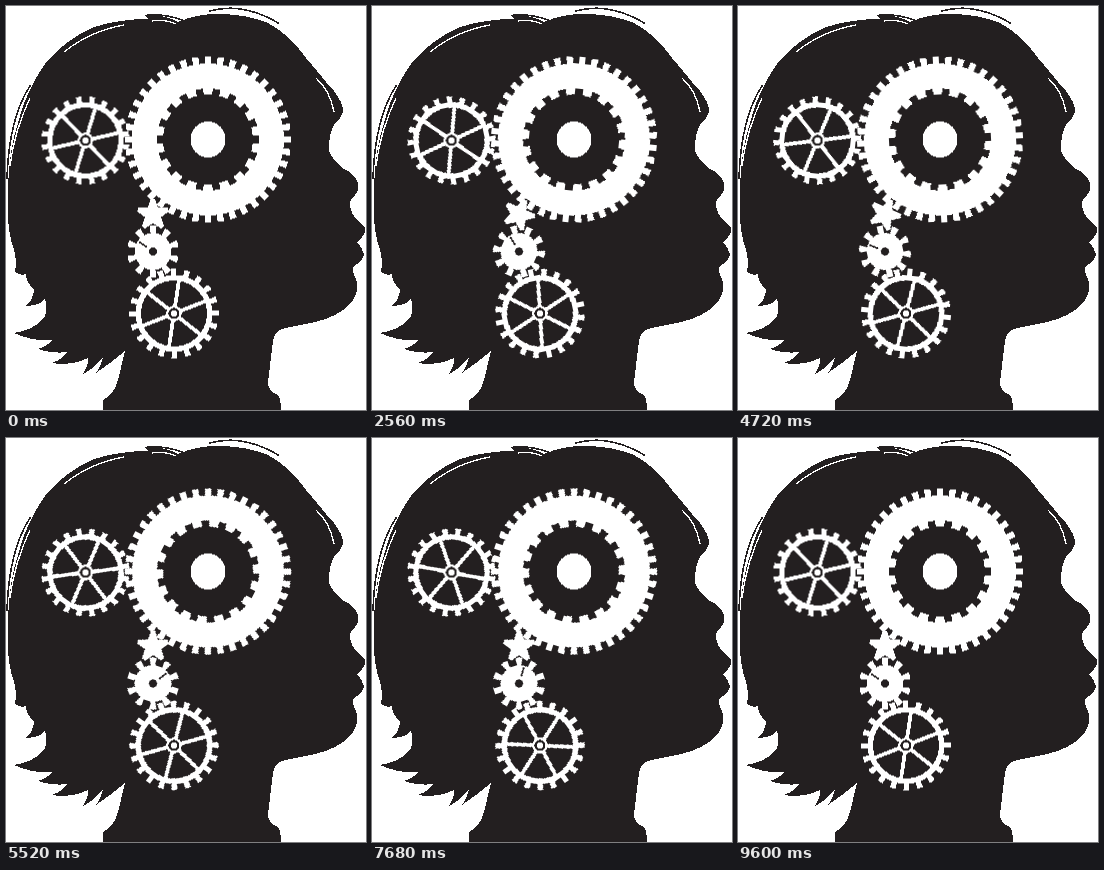
These frames come from a looping animation (360 by 404 pixels, 9680 ms). An HTML page:

```html
<!DOCTYPE html>
<html lang="en">
<head>
<meta charset="utf-8">
<title>Gears in a head</title>
<style>
  html, body { margin: 0; width: 100%; height: 100%; overflow: hidden; background: #fff; }
  svg { display: block; width: 360px; height: 404px; shape-rendering: crispEdges; --ink: #231f20; }
  .ink { fill: var(--ink); }
  .white { fill: #fff; }
  .line { fill: none; stroke: var(--ink); stroke-linecap: round; }
  .gap { fill: none; stroke: #fff; stroke-linecap: round; }
  .teeth { fill: none; stroke: #fff; }
  .teeth.dark { stroke: var(--ink); }
  .rim { fill: none; stroke: #fff; stroke-width: 5.5; }
  .spokes { stroke: #fff; stroke-width: 3.8; }
  /* 121 held poses; the last one equals the first */
  .spin { animation: spin 9680ms steps(121, end) infinite; }
  @keyframes spin {
    from { transform: rotate(0deg); }
    to { transform: rotate(calc(var(--step) * 121)); }
  }
</style>
</head>
<body>
<svg viewBox="0 0 360 404">
  <defs>
    <g id="wheel">
      <circle class="rim" r="35.7"/>
      <path id="bar" class="spokes" d="M-34 0H34"/>
    </g>
    <g id="hub">
      <circle class="white" r="7.8"/>
      <circle class="ink" r="5.6"/>
      <circle class="white" r="3.2"/>
    </g>
  </defs>

  <!-- face, neck and crown -->
  <path class="ink" d="M97 404V394Q108 389 112 374L119 345L60 300L30 260L14 110
    Q22 82 39 58Q60 33 88 21Q114 13 142 13L138 9Q158 8 172 16
    Q190 8 212 8Q240 8 262 17Q284 29 300 52Q312 66 320 76
    Q334 90 337 102Q337 112 329 117Q322 130 323 145Q328 156 338 163
    Q349 168 352 177Q354 186 346 192Q342 197 346 207Q350 214 358 220
    Q362 227 351 236Q356 241 358 249Q356 256 348 260Q345 264 350 273
    Q355 286 343 299Q331 311 309 316L280 322Q268 324 267 335L262 376
    Q262 386 272 389Q275 393 275 404Z"/>
  <!-- back hair -->
  <path class="ink" d="M119 345Q106 356 90 367Q96 358 97 351Q89 362 77 368
    Q83 358 82 352Q66 360 46 357Q57 353 61 346Q48 348 32 343Q42 340 46 334
    Q28 336 8 327Q28 324 38 312Q42 304 39 292Q36 299 20 300Q27 294 28 284
    Q20 276 20 268Q14 270 9 266Q11 254 8 244Q0 222 2 185Q2 146 14 110
    L130 120L160 345Z"/>
  <!-- loose strands -->
  <g class="line" stroke-width="1.6">
    <path d="M24 80Q3 112 1 172"/>
    <path d="M142 9Q160 8 176 14"/>
    <path d="M204 5Q222 0 240 4T272 17"/>
  </g>
  <g class="gap" stroke-width="1.3">
    <path d="M58 46Q84 25 118 19"/>
    <path d="M146 15Q160 13 170 18"/>
    <path d="M310 72Q324 84 328 106"/>
    <path d="M4 160Q8 126 24 92"/>
  </g>

  <!-- large ring -->
  <g transform="translate(202 133.5)">
    <g class="spin" style="--step:3deg">
      <circle class="white" r="76"/>
      <circle class="teeth" r="79" stroke-width="8" pathLength="40" stroke-dasharray=".5 .5" stroke-dashoffset=".25"/>
      <circle class="ink" r="45"/>
      <circle class="teeth dark" r="47.5" stroke-width="7" pathLength="18" stroke-dasharray=".45 .55" stroke-dashoffset=".225"/>
    </g>
    <ellipse class="white" rx="17.5" ry="18"/>
  </g>

  <!-- left wheel -->
  <g transform="translate(79.5 134.5)">
    <g class="spin" style="--step:-6deg">
      <g transform="rotate(47)">
        <use href="#wheel"/>
        <use href="#bar" transform="rotate(60)"/>
        <use href="#bar" transform="rotate(120)"/>
      </g>
      <circle class="teeth" transform="rotate(9)" r="40.7" stroke-width="6.6" pathLength="20" stroke-dasharray=".42 .58" stroke-dashoffset=".21"/>
    </g>
    <use href="#hub"/>
  </g>

  <!-- star pinion -->
  <g transform="translate(147 208.5)">
    <g class="spin" style="--step:-24deg">
      <path id="point" class="white" d="M-6 -4L-2 -16H2L6 -4L0 2Z"/>
      <use href="#point" transform="rotate(72)"/>
      <use href="#point" transform="rotate(144)"/>
      <use href="#point" transform="rotate(216)"/>
      <use href="#point" transform="rotate(288)"/>
      <circle class="white" r="7.5"/>
    </g>
  </g>

  <!-- slotted gear -->
  <g transform="translate(147 245.5)">
    <g class="spin" style="--step:12deg">
      <circle class="white" r="18.5"/>
      <circle class="teeth" transform="rotate(18)" r="22" stroke-width="8" pathLength="10" stroke-dasharray=".42 .58" stroke-dashoffset=".21"/>
      <circle class="ink" r="4.3"/>
      <path class="line" transform="rotate(215)" d="M8 0H16" stroke-width="1.8"/>
    </g>
  </g>

  <!-- lower wheel -->
  <g transform="translate(168 307.5)">
    <g class="spin" style="--step:-6deg">
      <g transform="rotate(38.5)">
        <use href="#wheel"/>
        <use href="#bar" transform="rotate(60)"/>
        <use href="#bar" transform="rotate(120)"/>
      </g>
      <circle class="teeth" transform="rotate(-.5)" r="41.2" stroke-width="7" pathLength="20" stroke-dasharray=".42 .58" stroke-dashoffset=".21"/>
    </g>
    <use href="#hub"/>
  </g>
</svg>
</body>
</html>
```
